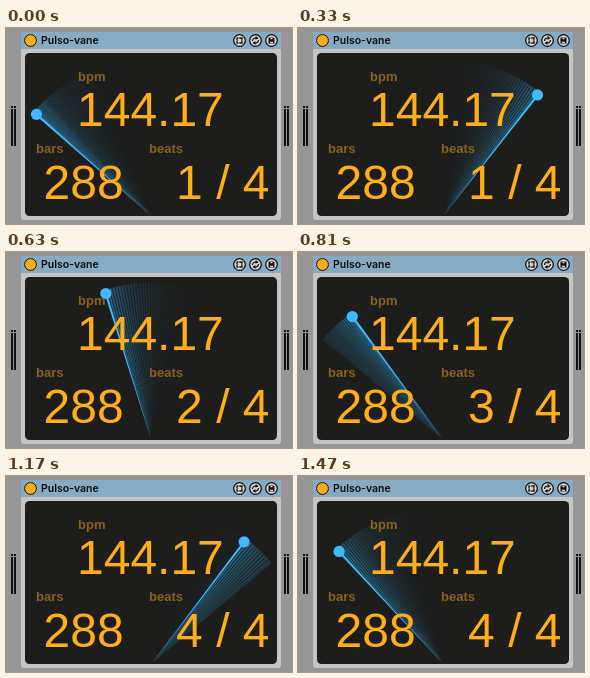
An HTML page that plays this animation: 286 px wide and 196 px high, repeating every 1500 ms.

```html
<!DOCTYPE html>
<html lang="en">
<head>
<meta charset="utf-8">
<title>Metronome</title>
<style>
  html, body { margin: 0; width: 100%; height: 100%; overflow: hidden; background: #969696; }
  svg { display: block; width: 286px; height: 196px; }
  .num { font: 48px "Liberation Sans", Arial, sans-serif; fill: #ffae1a; }
  .label { font: bold 13px "Liberation Sans", Arial, sans-serif; fill: #8a621b; }
  .title { font: 600 10.5px Inter, Roboto, sans-serif; fill: #0a0a0a; }
</style>
</head>
<body>
<svg viewBox="0 0 286 196">
  <defs>
    <clipPath id="screen"><rect x="19" y="25" width="252" height="163" rx="4.5"/></clipPath>
    <path id="grip" fill="#111" d="M0 0h2v2h-2zM3 0h2v2h-2zM0 3h2v37h-2zM3 3h2v37h-2z"/>
    <circle id="button" r="5.8" fill="#d6d6d6" stroke="#111" stroke-width="1.3"/>
  </defs>

  <rect width="286" height="196" fill="#969696"/>
  <use href="#grip" x="5" y="78"/>
  <use href="#grip" x="278" y="78"/>
  <rect x="15" y="4" width="260" height="188" rx="3" fill="#c5c5c5"/>
  <path d="M15 21V7q0-3 3-3h254q3 0 3 3v14z" fill="#87abc3"/>

  <circle cx="24.5" cy="12.5" r="5.9" fill="#ffad18" stroke="#16140f"/>
  <text class="title" x="35" y="16">Pulso-vane</text>

  <g transform="translate(233.5 12.5)">
    <use href="#button"/>
    <path d="M-2.5-2.5h5v5h-5z" fill="none" stroke="#111" stroke-width="1.3"/>
    <path d="M-.7-4v8M-4 0h1M3 0h1" stroke="#d6d6d6" stroke-width="1"/>
  </g>
  <g transform="translate(249.5 12.5)">
    <use href="#button"/>
    <path d="M-3 .5q0-3 3.5-3M3-.5q0 3-3.5 3" fill="none" stroke="#111" stroke-width="1.2"/>
    <path d="M0-4.5l3 2-3 2zM0 4.5l-3-2 3-2z" fill="#111"/>
  </g>
  <g transform="translate(265.5 12.5)">
    <use href="#button"/>
    <path d="M-3-3h5l1 1v5h-6z" fill="#111"/>
    <path d="M-1-2.5h2v1.3h-2zM-1.5 1.2h3v1.2h-3z" fill="#d6d6d6"/>
  </g>

  <rect x="19" y="25" width="252" height="163" rx="4.5" fill="#1d1d1b"/>
  <g clip-path="url(#screen)">
    <g id="trail" fill="#2fa8e8"></g>
    <path id="arm" fill="#40b9ff"/>
    <circle id="bob" r="5.6" fill="#40b9ff"/>
  </g>

  <text class="label" x="72" y="53">bpm</text>
  <text class="label" x="30" y="125">bars</text>
  <text class="label" x="143" y="125">beats</text>
  <text class="num" x="71" y="98">144.17</text>
  <text class="num" x="37.5" y="170.5">288</text>
  <text class="num" id="beat" x="263.5" y="170.5" text-anchor="end">1 / 4</text>
</svg>
<script>
  const LOOP = 1500, TICK = 30, BEAT = 375;
  const PIVOT = { x: 145.3, y: 188 }, REACH = 153.4, TIP = 157;
  const RAYS = 36, GAP = 4, FADE = 0.89;

  // [ms, degrees from upright]: nearly steady swings between two limits
  const SWING = [
    [0, -48.5], [6, -50], [180, -2.4], [375, 50], [480, 23.7], [750, -50],
    [810, -36.4], [1020, 20.5], [1080, 35.2], [1125, 50], [1290, 3.2],
    [1470, -42.8], [1500, -48.5]
  ];

  const $ = id => document.getElementById(id);
  const arm = $("arm"), bob = $("bob"), beat = $("beat"), trail = $("trail");

  const rays = Array.from({ length: RAYS }, (_, i) => {
    const ray = document.createElementNS("http://www.w3.org/2000/svg", "path");
    ray.setAttribute("fill-opacity", 0.5 * FADE ** i);
    return trail.appendChild(ray);
  });

  function angleAt(ms) {
    const t = (ms + LOOP) % LOOP;
    const i = SWING.findIndex(key => key[0] > t);
    const [t0, a0] = SWING[i - 1], [t1, a1] = SWING[i];
    return a0 + (a1 - a0) * (t - t0) / (t1 - t0);
  }

  function polar(deg, r) {
    const a = deg * Math.PI / 180;
    return { x: PIVOT.x + r * Math.sin(a), y: PIVOT.y - r * Math.cos(a) };
  }

  // A needle that narrows to a point at the pivot
  function aim(path, deg, r, width) {
    const half = width / r / 2 * 180 / Math.PI;
    const a = polar(deg - half, r), b = polar(deg + half, r);
    path.setAttribute("d", `M${PIVOT.x} ${PIVOT.y}L${a.x} ${a.y}L${b.x} ${b.y}z`);
  }

  function draw(t) {
    const angle = angleAt(t), head = polar(angle, REACH);
    rays.forEach((ray, i) => aim(ray, angleAt(t - (i + 1) * GAP), TIP, 2));
    aim(arm, angle, REACH, 2.4);
    bob.setAttribute("cx", head.x);
    bob.setAttribute("cy", head.y);
    beat.textContent = Math.floor(t / BEAT) + 1 + " / 4";
  }

  const start = performance.now();
  function frame() {
    const t = (performance.now() - start) % LOOP;
    draw(Math.floor(t / TICK) * TICK);
    requestAnimationFrame(frame);
  }
  frame();
</script>
</body>
</html>
```
